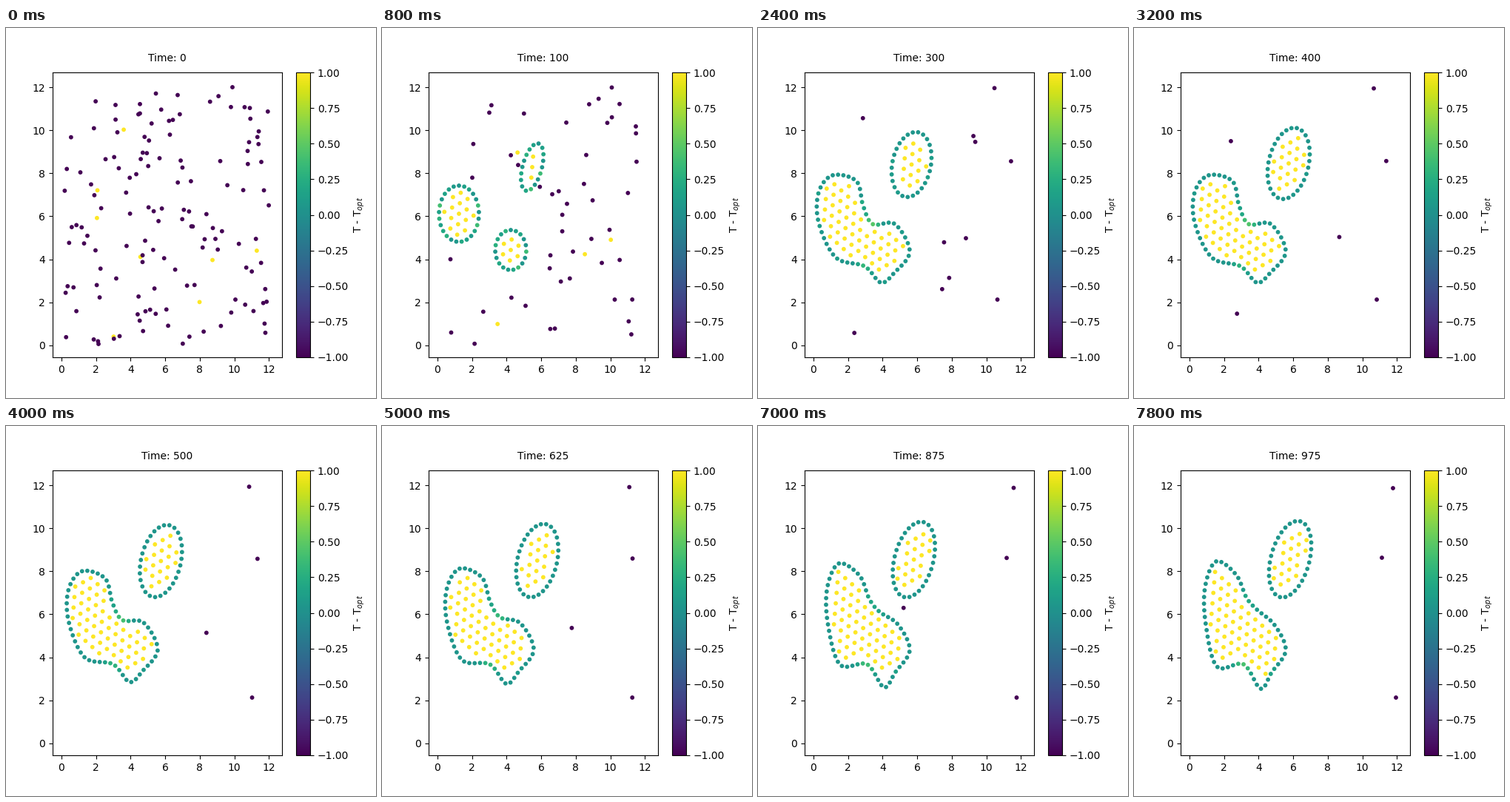
A matplotlib script for the animation above (8000 ms loop, 500 px wide and 500 px high).

```python
import numpy as np
import matplotlib.pyplot as plt
from matplotlib.animation import FuncAnimation
from matplotlib.path import Path

FRAMES, INTERVAL, STEP = 40, 200, 25
END = (FRAMES - 1) * STEP
MERGE = 300
CROWD = 137
XLIM, YLIM = (-0.535, 12.735), (-0.5576, 12.692)
rng = np.random.default_rng(11)

# Oval clusters: time, centre x, y, radius x, y (stage pixels), lean in degrees
LEFT = [(0, 104, 250, 4, 5, 0), (100, 104, 251, 27, 38, 0),
        (200, 109, 255, 31, 48, 0), (400, 112, 254, 31, 56, 0)]
MIDDLE = [(0, 172, 300, 4, 5, 0), (100, 174, 300, 21, 27, 0),
          (200, 178, 300, 27, 35, 0), (400, 177, 304, 28, 40, 0)]
TOP = [(0, 203, 188, 3, 6, 15), (100, 203, 188, 13, 33, 15),
       (200, 206, 186, 25, 40, 10), (400, 209, 183, 27, 49, 13),
       (975, 211, 180, 26, 53, 15)]

# Key points of the merged cluster, clockwise, at time 400 and at the end
BODY_A = [(101, 199), (133, 207), (142, 240), (155, 265), (185, 265), (205, 302),
          (184, 331), (166, 344), (144, 322), (105, 310), (82, 263), (82, 222)]
BODY_B = [(111, 183), (138, 201), (152, 232), (166, 248), (190, 269), (205, 303),
          (186, 333), (171, 355), (148, 322), (112, 325), (97, 268), (96, 218)]

# Last loose dots: start x, y, goal x, y (stage pixels), time of arrival
LAST = [(306, 80, 350, 84, 975), (345, 181, 335, 178, 975),
        (310, 367, 354, 367, 975), (283, 285, 195, 245, 880),
        (148, 104, 118, 190, 470), (125, 427, 150, 355, 470)]


def units(pts):
    """Stage pixels to axes units."""
    x, y = np.array(pts, float).T
    return np.c_[np.interp(x, (62.5, 372.5), XLIM),
                 np.interp(y, (60, 445), YLIM[::-1])]


def even(curve, gap=0.31):
    """Evenly spaced points along a closed curve."""
    q = np.vstack([curve, curve[:1]])
    s = np.r_[0, np.cumsum(np.hypot(*np.diff(q, axis=0).T))]
    at = np.linspace(0, s[-1], max(3, round(s[-1] / gap)), endpoint=False)
    return np.c_[np.interp(at, s, q[:, 0]), np.interp(at, s, q[:, 1])]


def oval(keys, t):
    times, *cols = np.array(keys, float).T
    cx, cy, rx, ry, lean = (np.interp(t, times, c) for c in cols)
    a = np.linspace(0, 2 * np.pi, 120, endpoint=False)
    r = np.radians(lean)
    x, y = rx * np.sin(a), -ry * np.cos(a)
    return units(np.c_[cx + x * np.cos(r) - y * np.sin(r),
                       cy + x * np.sin(r) + y * np.cos(r)])


def smooth(pts):
    """Closed Catmull-Rom curve."""
    a, b, c, d = (np.roll(pts, k, axis=0)[:, None] for k in (1, 0, -1, -2))
    u = np.linspace(0, 1, 20, endpoint=False)[None, :, None]
    q = b + u / 2 * (c - a + u * (2 * a - 5 * b + 4 * c - d
                                  + u * (3 * (b - c) + d - a)))
    return q.reshape(-1, 2)


def body(t):
    f = np.clip((t - 400) / (END - 400), 0, 1)
    return smooth(units(BODY_A) * (1 - f) + units(BODY_B) * f)


def outlines(t):
    if t == 0:
        return []
    lower = [body(t)] if t >= MERGE else [oval(LEFT, t), oval(MIDDLE, t)]
    return lower + [oval(TOP, t)]


def filling(edge, gap=0.49, margin=0.29, tilt=0.42):
    """Hexagonal lattice inside an edge."""
    i, j = np.mgrid[-14:15, -14:15].reshape(2, -1)
    r = tilt + np.pi / 3
    p = edge.mean(axis=0) + gap * np.c_[i * np.cos(tilt) + j * np.cos(r),
                                        i * np.sin(tilt) + j * np.sin(r)]
    space = np.hypot(*(p[:, None] - edge[None]).transpose(2, 0, 1)).min(axis=1)
    return p[Path(edge).contains_points(p) & (space > margin)]


def edge_values(edge, t):
    """Near zero on convex parts, warmer in hollows and while young."""
    (bx, by), (ax_, ay) = ((edge - np.roll(edge, 2, axis=0)).T,
                           (np.roll(edge, -2, axis=0) - edge).T)
    turn = (bx * ay - by * ax_) / (np.hypot(bx, by) * np.hypot(ax_, ay) + 1e-9)
    young = 0.8 * np.exp(-t / 130) * wobble[:len(edge)]
    return 0.04 + 0.5 * np.maximum(turn, 0) + young


def cluster(curve, t):
    edge = even(curve)
    core = filling(edge)
    return np.vstack([np.c_[edge, edge_values(edge, t)],
                      np.c_[core, np.ones(len(core))]])


# Every loose dot heads for a goal; far ones tend to be caught later
wobble = rng.random(200) ** 2
start = rng.uniform(0.05, 12.1, (CROWD, 2))
hubs = units([key[1][1:3] for key in (LEFT, MIDDLE, TOP)])
gaps = np.hypot(*(start[:, None] - hubs[None]).transpose(2, 0, 1))
rank = (gaps.min(axis=1) * rng.random(CROWD)).argsort().argsort()
arrive = np.sort(np.clip(rng.exponential(105, CROWD), 12, 390))[rank]
goal = hubs[gaps.argmin(axis=1)]
speed = rng.normal(0, 0.004, (CROWD, 2))
value = np.where(rng.random(CROWD) < 0.05, 1.0, -1.0)

last = np.array(LAST, float)
start = np.vstack([start, units(last[:, :2])])
goal = np.vstack([goal, units(last[:, 2:4])])
arrive = np.r_[arrive, last[:, 4]]
speed = np.vstack([speed, np.zeros((len(LAST), 2))])
value = np.r_[value, -np.ones(len(LAST))]
power = np.where(arrive >= END, 1, 3.5)


def dots(t):
    curves = outlines(t)
    s = np.clip(t / arrive, 0, 1) ** power
    roam = np.clip(start + speed * t, 0.05, 12.1)
    p = roam + (goal - roam) * s[:, None]
    loose = t <= arrive
    for c in curves:
        loose &= ~Path(c).contains_points(p)
    return np.vstack([cluster(c, t) for c in curves]
                     + [np.c_[p, value][loose]])


fig, ax = plt.subplots(figsize=(5, 5), dpi=100)
ax.set(xlim=XLIM, ylim=YLIM)
art = ax.scatter([0], [0], c=[0], s=10, cmap="viridis", vmin=-1, vmax=1)
fig.colorbar(art, ax=ax, label="T - T$_{opt}$")
clock = ax.text(0.5, 1.05, "", transform=ax.transAxes, ha="center", va="center")


def update(i):
    d = dots(i * STEP)
    art.set_offsets(d[:, :2])
    art.set_array(d[:, 2])
    clock.set_text(f"Time: {i * STEP}")
    return art, clock


anim = FuncAnimation(fig, update, frames=FRAMES, interval=INTERVAL, repeat=True)
plt.show()
```
